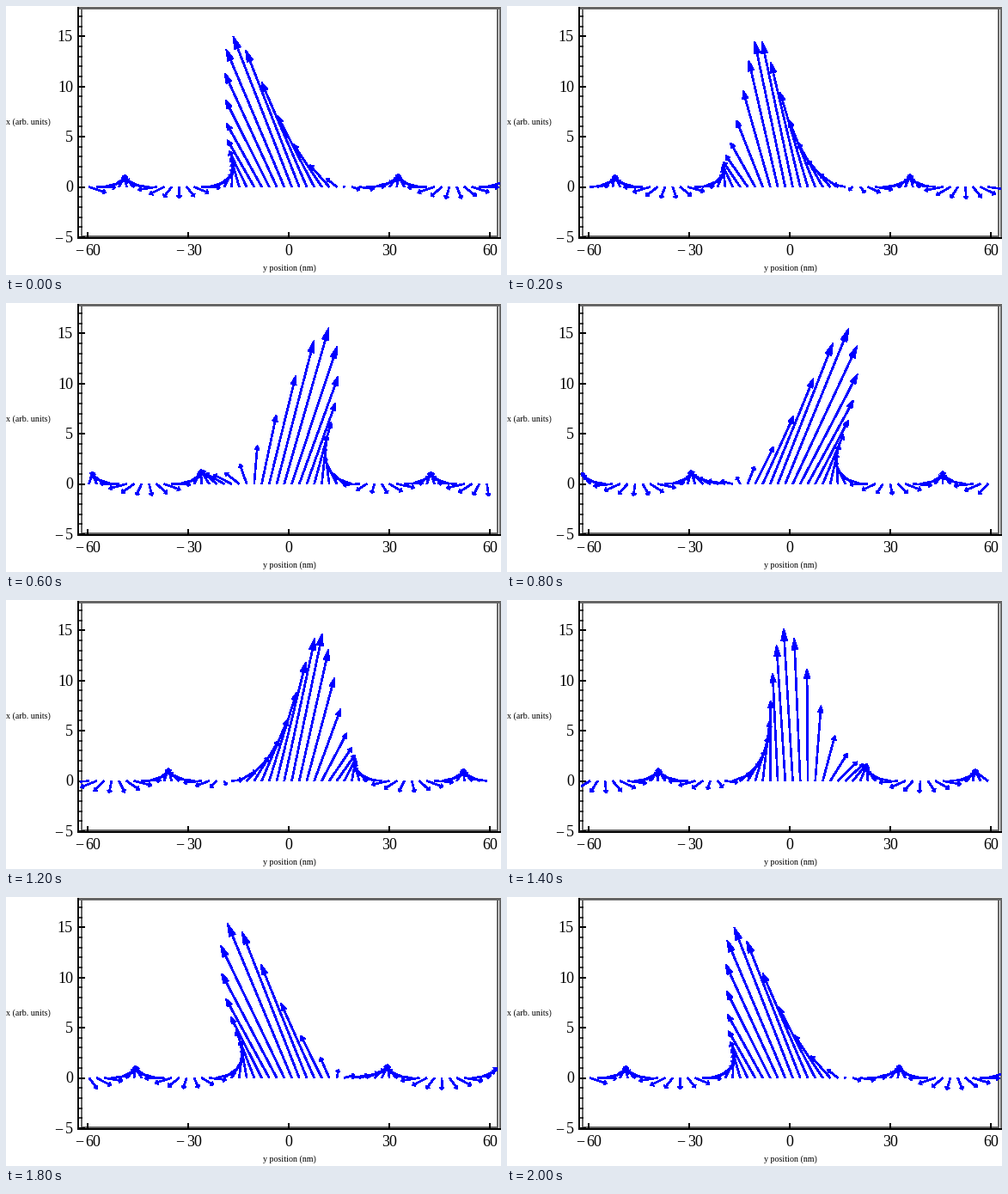
Animation of 576 by 313 pixels, one loop 2100 ms. Source, as a matplotlib script:

```python
import numpy as np
import matplotlib.pyplot as plt
from matplotlib.animation import FuncAnimation
from matplotlib.collections import LineCollection, PolyCollection
from matplotlib.patches import Rectangle

W, H, DPI = 576, 313, 100
FRAMES, PERIOD = 21, 20
PT = 72 / DPI                       # points per pixel
X0, Y0 = 328.5, 210.0               # pixel position of the data origin
SX, SY = 3.908, 11.68               # pixels per data unit
BLUE, GRAY = "#0000ff", "#666666"

fig = plt.figure(figsize=(W / DPI, H / DPI), dpi=DPI, facecolor="white")
ax = fig.add_axes([0, 0, 1, 1])
ax.set_xlim(-0.5, W - 0.5)
ax.set_ylim(H - 0.5, -0.5)
ax.axis("off")


def line(x1, y1, x2, y2, width, color="black"):
    ax.plot([x1, x2], [y1, y2], color=color, lw=width * PT,
            solid_capstyle="butt", zorder=1)


def text(x, y, s, size, ha="center"):
    ax.text(x, y, s, fontsize=size * PT, family="Liberation Serif",
            ha=ha, va="baseline")


def number(right, baseline, value):
    digits = str(abs(value))
    text(right, baseline, digits, 18, "right")
    if value < 0:
        text(right - 9 * len(digits) - 7.5, baseline, "\u2212", 18)


def draw_frame():
    line(83, 1, 575.5, 1, 3, GRAY)
    line(87, 0, 87, 267, 2, GRAY)
    line(86, 267, 572, 267, 2, GRAY)
    line(571, 0, 571, 267, 2, GRAY)
    line(574.5, 0, 574.5, 270, 2, GRAY)
    line(83.5, 0, 83.5, 270.5, 2)
    line(83, 269.5, 575.5, 269.5, 2)

    for v in range(-5, 18):
        y = Y0 - v * SY
        major = v % 5 == 0
        line(83, y, 91 if major else 88, y, 2 if major else 1.5)
        if major:
            number(77.5, y + 6, v)
    for v in range(-60, 61, 30):
        x = X0 + v * SX
        line(x, 262, x, 270, 2)
        half = 4.5 * len(str(abs(v))) + (7 if v < 0 else 0)
        number(x + half, 289, v)

    text(0, 137, "x (arb. units)", 10, "left")
    text(329, 307, "y position (nm)", 10)


# Arrow feet, measured in pixels from the centre
foot = (-59.45 + 2.235 * np.arange(54)) * SX
dist, side = np.abs(foot), np.sign(foot)
K = 2 * np.pi / 126.5


def field(phase):
    """Static bump, near field of a swinging dipole and outgoing waves."""
    u = phase - K * dist + 0.05
    near = np.exp(-(dist / 26.6) ** 1.535)
    fx = near * (12 * np.sin(phase) - 68.5 * np.cos(phase)) + 22 * np.sin(u)
    bump = 172 * (1 + dist ** 2 / 2480) ** -2.5
    swing = -2.85 * dist * np.exp(-dist ** 2 / 650) * np.sin(phase)
    wave = 14 * np.tanh(dist / 9) * np.cos(u)
    return fx, bump + side * (swing + wave)


def arrows(phase):
    fx, fy = field(phase)
    base = np.column_stack([X0 + foot, np.full_like(foot, Y0)])
    vec = np.column_stack([fx, -fy])
    size = np.maximum(np.hypot(fx, fy), 1e-6)[:, None]
    unit = vec / size
    normal = unit[:, ::-1] * [-1, 1]
    tip = base + vec
    neck = tip - unit * np.minimum(1.5 + 0.068 * size, size)
    wing = normal * np.minimum(2.3 + 0.007 * size, 0.3 * size)
    shafts = np.stack([base, tip - 0.5 * (tip - neck)], axis=1)
    heads = np.stack([tip, neck + wing, neck - wing], axis=1)
    return shafts, heads


draw_frame()
shaft_set = LineCollection([], colors=BLUE, linewidths=1.6 * PT,
                           antialiaseds=False, zorder=3)
head_set = PolyCollection([], facecolors=BLUE, edgecolors=BLUE,
                          linewidths=0.6 * PT, antialiaseds=False, zorder=3)
window = Rectangle((85.5, -0.5), 489, 270, transform=ax.transData)
for group in (shaft_set, head_set):
    ax.add_collection(group, autolim=False)
    group.set_clip_path(window)


def update(i):
    shafts, heads = arrows(2 * np.pi * (i % PERIOD) / PERIOD)
    shaft_set.set_segments(shafts)
    head_set.set_verts(heads)
    return shaft_set, head_set


anim = FuncAnimation(fig, update, frames=FRAMES, interval=100,
                     repeat=True, repeat_delay=0, blit=False)
plt.show()
```
